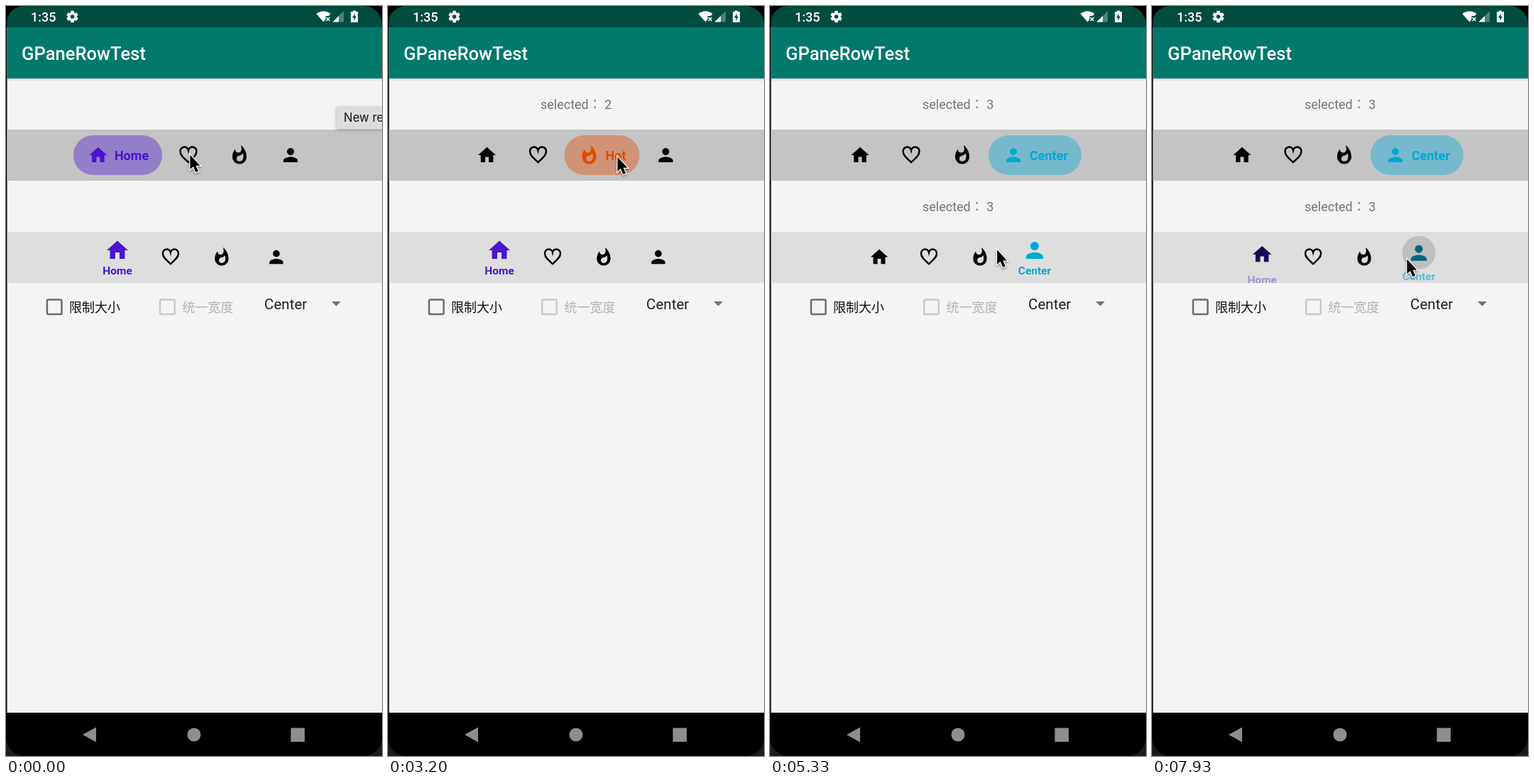
Write an HTML page with a canvas that moves like this. It is 530 px wide and 1056 px high and loops after 8000 ms.

```html
<!DOCTYPE html>
<html lang="en">
<head>
<meta charset="utf-8">
<title>Tab bars</title>
<style>
html, body { margin: 0; width: 100%; height: 100%; overflow: hidden; background: #000; }
canvas { display: block; }
</style>
</head>
<body>
<canvas id="stage" width="530" height="1056"></canvas>
<script>
const ctx = document.getElementById('stage').getContext('2d');
const LOOP = 8000, MORPH = 300, RIPPLE = 450;
const LEFT = 1.5, WIDTH = 528.5, MIDDLE = 265.5;
const SANS = 'Roboto, "Noto Sans CJK JP", sans-serif';
const CJK = '"Noto Sans CJK SC", "Noto Sans CJK", sans-serif';
const DARK = '#004d40';

// Icons live on a 24-unit grid
const icons = {
  home: new Path2D('M10 20v-6h4v6h5v-8h3L12 3 2 12h3v8z'),
  heart: new Path2D('M12 20C6.5 15 3 12 3 8.5a4.5 4.5 0 0 1 9-2 4.5 4.5 0 0 1 9 2C21 12 17.5 15 12 20z'),
  flame: new Path2D('M13.5.7C17.4 3.8 20 8.6 20 14a8 8 0 0 1-16 0c0-3.4 1.2-6.5 3.2-8.9a3.6 3.6 0 0 0 3.6 4.1c4 0 4-5.2 2.7-8.5zM11.7 19a3.2 3.2 0 0 1-.4-6.3q3.2-.7 4.6-2.6c1.1 3.9.6 8.9-4.2 8.9z'),
  person: new Path2D('M12 12a4 4 0 1 0 0-8 4 4 0 0 0 0 8zm0 2c-2.7 0-8 1.3-8 4v2h16v-2c0-2.7-5.3-4-8-4z')
};
const arrow = new Path2D('M0 0v20.5l4.5-4 3.4 8 3.7-1.5-3.5-7.8h6z');

const tabs = [
  { icon: 'home', label: 'Home', rgb: [74, 20, 208] },
  { icon: 'heart', label: 'Like', rgb: [230, 36, 102] },
  { icon: 'flame', label: 'Hot', rgb: [224, 74, 0] },
  { icon: 'person', label: 'Center', rgb: [0, 168, 214] }
];

const clicks = [
  { at: 1660, bar: 'upper', tab: 1, x: 257, y: 205 },
  { at: 2700, bar: 'upper', tab: 2, x: 323, y: 212 },
  { at: 3780, bar: 'upper', tab: 3, x: 385, y: 217 },
  { at: 4700, bar: 'lower', tab: 3, x: 376, y: 342 },
  { at: 5590, bar: 'lower', tab: 2, x: 298, y: 343 },
  { at: 6300, bar: 'lower', tab: 1, x: 231, y: 345 },
  { at: 7030, bar: 'lower', tab: 0, x: 161, y: 345 },
  { at: 7760, bar: 'lower', tab: 3, x: 359, y: 356 }
];

const clamp = v => Math.max(0, Math.min(1, v));
const mix = (a, b, k) => a + (b - a) * k;
const ease = k => (1 - Math.cos(Math.PI * clamp(k))) / 2;
const tint = (rgb, k = 1) => `rgb(${rgb.map(c => Math.round(c * k)).join()})`;

function rect(x, y, w, h, color) {
  ctx.fillStyle = color;
  ctx.fillRect(x, y, w, h);
}

function shape(path, color) {
  ctx.fillStyle = color;
  ctx.fill(new Path2D(path));
}

function disc(x, y, r, color) {
  ctx.fillStyle = color;
  ctx.beginPath();
  ctx.arc(x, y, r, 0, 2 * Math.PI);
  ctx.fill();
}

function text(str, x, y, font, color, align = 'left') {
  ctx.font = font;
  ctx.fillStyle = color;
  ctx.textAlign = align;
  ctx.fillText(str, x, y);
}

function faded(alpha, paint) {
  if (alpha <= 0) return;
  ctx.globalAlpha = alpha;
  paint();
  ctx.globalAlpha = 1;
}

function icon(name, x, y, scale, color) {
  ctx.save();
  ctx.translate(x, y);
  ctx.scale(scale, scale);
  ctx.translate(-12, -12);
  ctx.fillStyle = ctx.strokeStyle = color;
  ctx.lineWidth = 2;
  if (name === 'heart') ctx.stroke(icons.heart);
  else ctx.fill(icons[name], 'evenodd');
  ctx.restore();
}

function barState(bar, t) {
  const past = clicks.filter(c => c.bar === bar && c.at <= t);
  const last = past.at(-1), previous = past.at(-2);
  const from = previous ? previous.tab : 0;
  const to = last ? last.tab : 0;
  const age = last ? t - last.at : Infinity;
  const p = ease(age / MORPH);
  const amounts = tabs.map((_, i) => i === to ? p : i === from ? 1 - p : 0);
  return { to, age, amounts, touched: past.length > 0 };
}

function ripple(x, y, radius, age) {
  if (age >= RIPPLE) return;
  const alpha = 0.14 * clamp((RIPPLE - age) / 200);
  disc(x, y, radius * clamp(0.3 + age / 200), `rgba(0,0,0,${alpha})`);
}

function selection(state, y) {
  if (state.touched) text(`selected： ${state.to}`, 215, y, `18px ${SANS}`, '#757575');
}

function upperBar({ to, age, amounts }) {
  rect(LEFT, 174, WIDTH, 72, '#c4c4c4');
  const font = `700 18px ${SANS}`;
  ctx.font = font;
  const widths = tabs.map((tab, i) => mix(72, 79 + ctx.measureText(tab.label).width, amounts[i]));
  let x = MIDDLE - widths.reduce((a, b) => a + b) / 2;
  tabs.forEach((tab, i) => {
    const s = amounts[i], width = widths[i], color = tint(tab.rgb);
    faded(0.4 * s, () => {
      ctx.fillStyle = color;
      ctx.beginPath();
      ctx.roundRect(x + 1, 182, width - 2, 56, 28);
      ctx.fill();
    });
    if (i === to) ripple(x + 36, 210, 21, age);
    icon(tab.icon, x + 36, 210, 1.26, tint(tab.rgb, s));
    faded(s ** 0.7, () => text(tab.label, x + width - 13 - 7 * s, 217, font, color, 'right'));
    x += width;
  });
}

function lowerBar({ to, age, amounts }) {
  ctx.save();
  ctx.beginPath();
  ctx.rect(LEFT, 318, WIDTH, 72);
  ctx.clip();
  rect(LEFT, 318, WIDTH, 72, '#dedede');
  // The outer labels are wide enough to push their neighbours
  const [first, , , last] = amounts;
  const gaps = [70 + 5 * first, 72, 77, 0];
  let x = 160 - 3 * first - 6 * last;
  tabs.forEach((tab, i) => {
    const s = amounts[i], y = mix(353.5, 344, s);
    if (i === to) ripple(x, y - 0.5, 23.5, age);
    icon(tab.icon, x, y, mix(1.21, 1.5, s), tint(tab.rgb, s));
    faded(s, () => text(tab.label, x, 378 + 21 * (1 - s), `700 15.5px ${SANS}`, tint(tab.rgb), 'center'));
    x += gaps[i];
  });
  ctx.restore();
}

function gear(x, y) {
  ctx.save();
  ctx.translate(x, y);
  for (let i = 0; i < 6; i++) {
    rect(-2.3, -8.2, 4.6, 5, '#fff');
    ctx.rotate(Math.PI / 3);
  }
  disc(0, 0, 6.3, '#fff');
  disc(0, 0, 2.8, DARK);
  ctx.restore();
}

function statusBar() {
  rect(LEFT, 0, WIDTH, 30, DARK);
  text('1:35', 35, 21.5, `500 18px ${SANS}`, '#fff');
  gear(93.5, 15);
  // Wi-Fi fan with a cross
  shape('M437.5 11q10-7.5 20 0l-10 11.5z', '#fff');
  rect(450.5, 14, 8, 9, DARK);
  ctx.strokeStyle = '#fff';
  ctx.lineWidth = 1.6;
  ctx.stroke(new Path2D('M451.5 16l5 5m0-5l-5 5'));
  // Signal
  shape('M460.5 22.5H476V7z', 'rgba(255,255,255,.3)');
  shape('M460.5 22.5H469V14z', '#fff');
  // Battery
  shape('M486 8h3V6.5h4V8h3v15h-10z', '#fff');
  shape('M491.8 10.5l-3.8 6h2.4v4.3l3.6-6h-2.2z', DARK);
}

function appBar() {
  const shade = ctx.createLinearGradient(0, 102, 0, 106);
  shade.addColorStop(0, 'rgba(0,0,0,.14)');
  shade.addColorStop(1, 'rgba(0,0,0,0)');
  rect(LEFT, 102, WIDTH, 4, shade);
  rect(LEFT, 30, WIDTH, 72, '#00796b');
  text('GPaneRowTest', 22, 76, `500 25.6px ${SANS}`, '#fff');
}

function checkbox(x, label, color, ink) {
  ctx.strokeStyle = color;
  ctx.lineWidth = 2.5;
  ctx.beginPath();
  ctx.roundRect(x, 413.4, 20.6, 20.6, 1.5);
  ctx.stroke();
  text(label, x + 31.2, 430.5, `18px ${CJK}`, ink);
}

function options() {
  checkbox(57.9, '限制大小', '#6b6b6b', '#111');
  checkbox(217.2, '统一宽度', '#c9c9c9', '#b3b3b3');
  text('Center', 364, 427, `20.6px ${SANS}`, '#212121');
  shape('M459 416h13l-6.5 6.5z', '#737373');
}

function navBar() {
  const gray = '#8e8e8e';
  rect(0, 995, 530, 61, '#000');
  shape('M108 1026l19-10.5v21z', gray);
  disc(265, 1026, 9.5, gray);
  rect(401.5, 1016.5, 19.5, 19.5, gray);
}

function corners() {
  const r = 26;
  for (const x of [0, 530]) for (const y of [0, 1056]) {
    const dx = x ? -r : r, dy = y ? -r : r;
    ctx.fillStyle = y ? '#1c1c1c' : '#000';
    ctx.beginPath();
    ctx.moveTo(x, y);
    ctx.lineTo(x + dx, y);
    ctx.arcTo(x, y, x, y + dy, r);
    ctx.fill();
  }
}

function tooltip() {
  ctx.save();
  ctx.shadowColor = 'rgba(0,0,0,.35)';
  ctx.shadowBlur = 4;
  ctx.shadowOffsetY = 1;
  rect(466, 142, 70, 31, '#dcdcdc');
  ctx.restore();
  text('New re', 476, 163, '16.8px Inter, sans-serif', '#161616');
}

// The pointer reaches each click point 100 ms before pressing
function cursor(t) {
  let x = 259, y = 209;
  for (const click of clicks) {
    const k = ease((t - click.at + 550) / 450);
    x = mix(x, click.x, k);
    y = mix(y, click.y, k);
  }
  ctx.save();
  ctx.translate(x + 0.5, y + 0.5);
  ctx.strokeStyle = '#fff';
  ctx.lineWidth = 2.6;
  ctx.shadowColor = 'rgba(0,0,0,.4)';
  ctx.shadowBlur = 3;
  ctx.shadowOffsetY = 1.5;
  ctx.stroke(arrow);
  ctx.shadowColor = 'transparent';
  ctx.fillStyle = '#000';
  ctx.fill(arrow);
  ctx.restore();
}

function draw(t) {
  const upper = barState('upper', t), lower = barState('lower', t);
  rect(0, 0, 530, 1056, '#000');
  rect(LEFT, 30, WIDTH, 965, '#f4f4f4');
  appBar();
  statusBar();
  selection(upper, 145);
  upperBar(upper);
  selection(lower, 289);
  lowerBar(lower);
  options();
  navBar();
  corners();
  if (t < 400) tooltip();
  cursor(t);
}

const start = performance.now();
function tick() {
  draw((performance.now() - start) % LOOP);
  requestAnimationFrame(tick);
}
tick();
</script>
</body>
</html>
```
